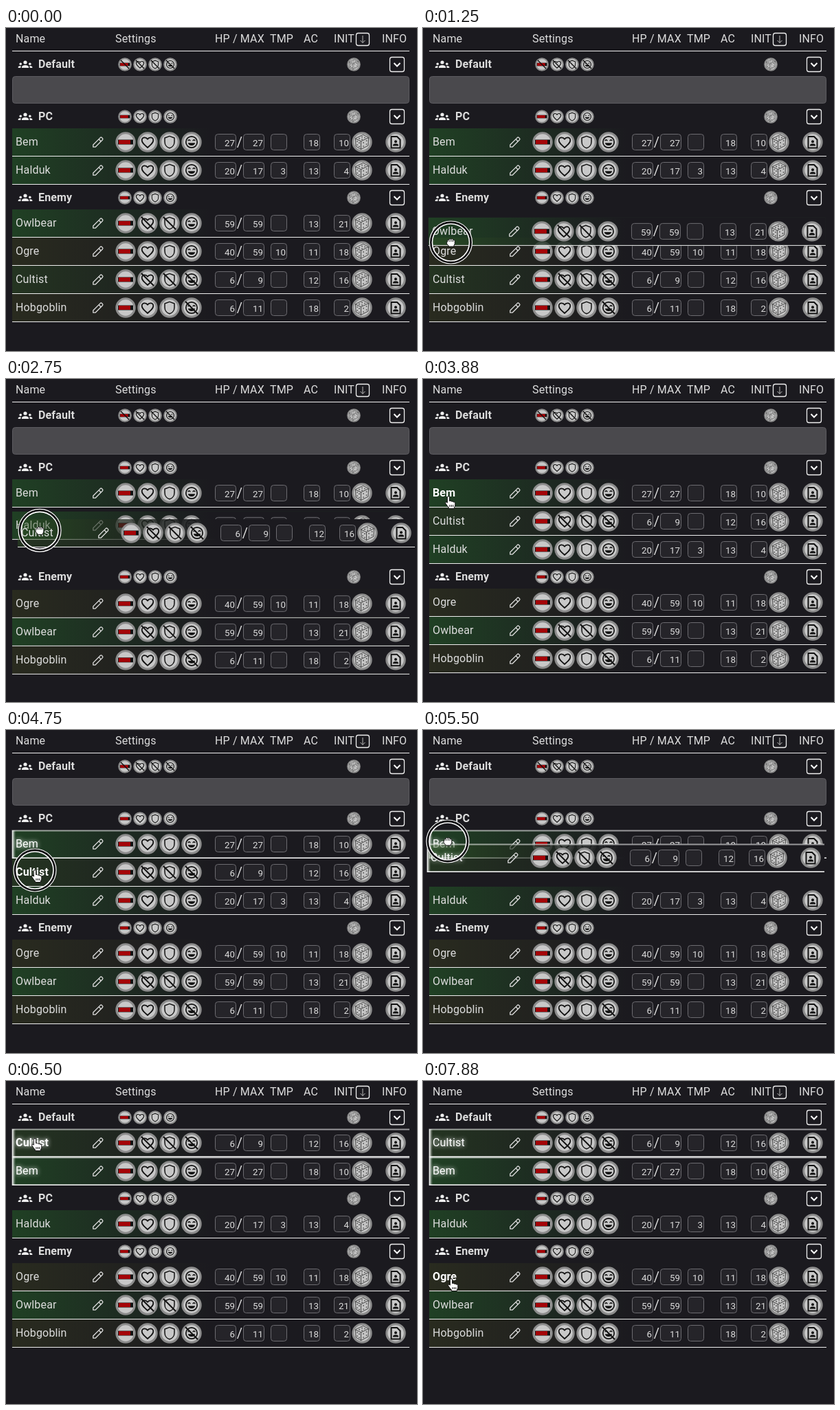
These frames come from a looping animation (598 px wide and 470 px high, 8000 ms). An HTML page:

```html
<!DOCTYPE html>
<html lang="en">
<head>
<meta charset="utf-8">
<title>Initiative list</title>
<style>
  html, body { margin: 0; width: 100%; height: 100%; overflow: hidden; background: #1b1a1f; }
  svg { display: block; }
  text { font: 16px Roboto, Arial, sans-serif; letter-spacing: .15px; fill: #dcdcdc; }
  .group text { font-weight: 700; }
  text.num { font-size: 13.33px; letter-spacing: 0; text-anchor: end; }
  text.per { font-size: 20px; text-anchor: middle; }
  .box { fill: #252429; stroke: #6c6b70; }
  .btn { fill: none; stroke: #eee; stroke-width: 1.3; }
  .line { fill: none; stroke: #111; stroke-linejoin: round; stroke-linecap: round; }
  .hover .name { font-weight: 700; fill: #fff; }
  .glow { display: none; }
  .selected .glow { display: inline; }
  .selected .name { fill: #fff; filter: drop-shadow(0 0 3px #fff); }
  #cursor path { fill: #fff; stroke: #111; stroke-linejoin: round; }
</style>
</head>
<body>
<svg width="598" height="470" viewBox="0 0 598 470">
  <defs>
    <linearGradient id="edge">
      <stop stop-color="#fff" stop-opacity=".8"/>
      <stop offset="1" stop-color="#fff" stop-opacity="0"/>
    </linearGradient>
    <linearGradient id="fade">
      <stop stop-color="#1b1a1f" stop-opacity="0"/>
      <stop offset=".5" stop-color="#1b1a1f"/>
    </linearGradient>
    <g id="bar">
      <rect x="-11" y="-3.5" width="22" height="7" fill="#111"/>
      <rect x="-10" y="-3" width="17" height="6" fill="#a40408"/>
    </g>
    <g id="heart" class="line" stroke-width="1.8">
      <path d="M0 8C-5.5 3.3-8.3 .8-8.3-2.6C-8.3-5-6.5-6.7-4.3-6.7C-2.5-6.7-1-5.8 0-4.2C1-5.8 2.5-6.7 4.3-6.7C6.5-6.7 8.3-5 8.3-2.6C8.3 .8 5.5 3.3 0 8Z"/>
    </g>
    <g id="shield" class="line" stroke-width="1.5">
      <path d="M0-8.6L7-6V-.6C7 3.8 4 7.6 0 8.8C-4 7.6-7 3.8-7-.6V-6Z"/>
    </g>
    <g id="smile">
      <circle class="line" r="8.2" stroke-width="1.7"/>
      <path class="line" d="M-5-2.2q1.5-2 3 0M2-2.2q1.5-2 3 0" stroke-width="1.4"/>
      <path d="M-5.2 1.2H5.2A5.3 4.6 0 0 1-5.2 1.2Z" fill="#111"/>
    </g>
    <path id="slash" class="line" d="M-8.5-8.5L8.5 8.5" stroke-width="2"/>
    <g id="die" class="line" stroke-width="1">
      <path d="M2-10.5L9.5-6.5L9 5L-1.5 10.5L-9 6L-9.5-5Z" fill="#c4c4c4" stroke="#444"/>
      <path d="M-9.5-5L-1.5-1.2L9.5-6.5M-1.5-1.2V10.5" stroke="#444"/>
      <path d="M-4-5.3h.1M0-7.5h.1M4-6.5h.1M0-4h.1M-7-1h.1M-4 1.2h.1M-7 4h.1M-4 6.5h.1M6.5-2h.1M2 .8h.1M6.5 3h.1M2 6h.1" stroke="#444" stroke-width="1.7"/>
    </g>
    <g id="info">
      <path class="line" d="M2-8H-6.5V8.5H6.5V-3.5Z" stroke-width="2"/>
      <circle cy="-.8" r="2" fill="#111"/>
      <path d="M-4 5.5V4.3Q-3.5 2.2 0 2.2T4 4.3V5.5Z" fill="#111"/>
    </g>
    <path id="pencil" d="M-7.2 7.2V4L3.2-6.4Q4.4-7.5 5.5-6.4L6.4-5.5Q7.5-4.4 6.4-3.2L-4 7.2ZM1-4.2L4.2-1" fill="none" stroke="#ddd" stroke-width="1.3" stroke-linejoin="round"/>
    <g id="people" fill="#eee">
      <circle cy="-3" r="2.6"/><circle cx="-6.8" cy="-.8" r="1.8"/><circle cx="6.8" cy="-.8" r="1.8"/>
      <path d="M-5 5V3.6Q-4.4 1 0 1T5 3.6V5ZM-10.3 5V3.6Q-9.8 1.8-6.3 1.9Q-6.6 3-6.5 5ZM10.3 5V3.6Q9.8 1.8 6.3 1.9Q6.6 3 6.5 5Z"/>
    </g>
  </defs>
  <text x="14" y="21">Name</text>
  <text x="159" y="21">Settings</text>
  <text x="304" y="21">HP / MAX</text>
  <text x="384" y="21">TMP</text>
  <text x="433" y="21">AC</text>
  <text x="477" y="21">INIT</text>
  <text x="547" y="21">INFO</text>
  <rect class="btn" x="509.5" y="7.5" width="19" height="18" rx="3"/>
  <path d="M519 11V21.5M515.5 18L519 21.5L522.5 18" fill="none" stroke="#bbb"/>
  <rect x="9" y="33" width="578" height="1" fill="#eee"/>
  <rect id="zone" x="9.5" y="70.5" width="577" height="39" rx="4" fill="#4a494d" stroke="#5c5b60"/>
  <g id="groups"></g>
  <g id="rows"></g>
  <g id="cursor">
    <g id="ring" fill="none" stroke="#fff">
      <circle r="29" stroke="#08080a" stroke-width="5"/>
      <circle r="31" stroke-width="1.2"/>
      <circle r="27" stroke-width="1.6"/>
    </g>
    <path id="pointer" d="M-1.6 1.2a1.6 1.6 0 0 1 3.2 0V6.5Q3.6 5.5 4.4 7.2Q6.4 6.4 7.2 8Q9.4 7.4 9.8 9.4V12.5Q9.6 14.4 8.4 16V17.5H.4V16Q-2 13.6-4.4 9.6Q-4.4 7.4-2.4 8.2L-1.6 9.2ZM2 12v3M4.4 12v3M6.8 12v3"/>
    <path id="grab" d="M-4.5 2L-7.2-1.6Q-7-3.8-5-2.6L-3.2-.8L-4.8-5.6Q-4.2-7.6-2.6-6.2L-1-2L-.8-7.2Q.4-8.8 1.4-7.2L1.6-2L3.2-6.2Q4.8-7.2 5.2-5.4L4.2-.4L5.6-2.4Q7.6-3 7.3-1L4.8 4L4 8H-2.6Z"/>
    <path id="fist" d="M-5-1Q-5.4-4.4-2.8-4Q-1.6-6 .2-4.8Q2-6 3.2-4Q5.6-4.4 5.8-1.8V1.8L4 6H-2.6L-5.8 2Q-6.6-.4-5-1ZM-2.4-3.6V-1M.4-4.4V-1M3-3.6V-1"/>
  </g>
</svg>
<script>
const LOOP = 8000, STEP = 125;
const FIRST_HEAD = 53, HEAD = 36, ROW = 41, EMPTY = 40;
const SLIDE = 200;   // time a row takes to make room
const $ = id => document.getElementById(id);
const clamp = p => Math.max(0, Math.min(1, p));
const easeOut = p => 1 - (1 - clamp(p)) ** 3;
const smooth = p => clamp(p) ** 2 * (3 - 2 * clamp(p));
const mix = (a, b, p) => a + (b - a) * p;

const GREEN = '#2a792c', MOSS = '#325b24', OLIVE = '#3f451f';
// off marks crossed-out settings; nums are HP, max, temporary, AC, initiative
const rows = [
  { name: 'Bem', off: '0000', nums: [27, 27, '', 18, 10], tint: GREEN },
  { name: 'Halduk', off: '0000', nums: [20, 17, 3, 13, 4], tint: GREEN },
  { name: 'Owlbear', off: '0110', nums: [59, 59, '', 13, 21], tint: GREEN },
  { name: 'Ogre', off: '0000', nums: [40, 59, 10, 11, 18], tint: OLIVE },
  { name: 'Cultist', off: '0111', nums: [6, 9, '', 12, 16], tint: MOSS },
  { name: 'Hobgoblin', off: '0001', nums: [6, 11, '', 18, 2], tint: OLIVE }
];
const groups = [
  { name: 'Default', off: '1111', list: [] },
  { name: 'PC', off: '0000', list: ['Bem', 'Halduk'] },
  { name: 'Enemy', off: '0000', list: ['Owlbear', 'Ogre', 'Cultist', 'Hobgoblin'] }
];

// Stops of the hand: time, x, y
const path = [
  [250, 90, 325], [1000, 44, 274], [1500, 37, 350], [1875, 38, 345], [2250, 42, 324], [2625, 50, 223], [3125, 44, 206],
  [3875, 37, 171], [4250, 37, 171], [4750, 42, 204], [5250, 42, 204], [5500, 36, 162], [5750, 42, 84], [6500, 42, 84],
  [7875, 41, 288]
];
const clicks = [{ row: 'Bem', press: 4000, release: 4250 }, { row: 'Cultist', press: 4750, release: 5000 }];
// over lists the places passed: time, group, index
const drags = [
  { row: 'Owlbear', press: 1000, release: 1625, over: [[1000, 2, 0], [1250, 2, 1], [1400, 2, 2]] },
  { row: 'Cultist', press: 2250, release: 3125, over: [[2250, 2, 1], [2375, 2, 0], [2625, 1, 2], [2740, 1, 1]] },
  { row: 'Cultist', press: 5125, release: 6375, over: [[5125, 1, 1], [5600, 1, 0], [5750, 0, 0]], along: ['Bem'] }
];

function handAt(t) {
  const i = path.findIndex(stop => stop[0] > t);
  if (i < 0) return path.at(-1).slice(1);
  if (i === 0) return path[0].slice(1);
  const [t0, x0, y0] = path[i - 1], [t1, x1, y1] = path[i];
  const p = smooth((t - t0) / (t1 - t0));
  return [mix(x0, x1, p), mix(y0, y1, p)];
}

// One stable arrangement of the lists; a dragged row keeps its room at home.
function phase(time, lists, drag, group, index) {
  const heads = [], slots = {};
  let y = FIRST_HEAD;
  lists.forEach((list, g) => {
    const shown = list.filter(name => name !== drag);
    const target = drag && g === group;
    if (target) shown.splice(index, 0, drag);
    shown.forEach((name, i) => slots[name] = { g, i });
    heads.push(y);
    y += HEAD + Math.max(EMPTY, list.length * ROW) + (target && !list.includes(drag) ? ROW : 0);
  });
  return { time, heads, slots, drag, group, empty: !lists[0].length };
}

let lists = groups.map(g => g.list);
const phases = [phase(0, lists)];
for (const d of drags) {
  for (const [time, g, i] of d.over) phases.push(phase(time, lists, d.row, g, i));
  const [, g, i] = d.over.at(-1), moved = [d.row, ...(d.along || [])];
  lists = lists.map(list => list.filter(name => !moved.includes(name)));
  lists[g].splice(i, 0, ...moved);
  phases.push(phase(d.release + STEP, lists));
}

// Rows slide between slots while something is dragged; headings jump.
function rowY(name, t) {
  let slot = 0, y = 0;
  for (const p of phases) {
    if (t < p.time) break;
    const { g, i } = p.slots[name];
    slot = p.drag ? mix(slot, i, easeOut((t - p.time) / SLIDE)) : i;
    y = p.heads[g] + HEAD + 1 + slot * ROW;
  }
  return y;
}

// A dragged row trails the hand by one step, then settles in its slot.
function dragPos(d, t) {
  const [x0, y0] = handAt(d.press), [x, y] = handAt(Math.max(d.press, Math.min(t, d.release) - STEP));
  const settle = easeOut((t - d.release) / STEP);
  const home = rowY(d.row, d.press - 1);
  return [mix(x - x0, 0, settle), mix(home + y - y0, rowY(d.row, d.release), settle)];
}

const icon = (id, x, size, off) => `<g transform="translate(${x}) scale(${size})">
  <circle r="13.2" fill="#c8c8c8" stroke="#8c8c8c" stroke-width="3"/><use href="#${id}"/>
  ${off ? '<use class="slash" href="#slash"/>' : ''}</g>`;
const settings = (x, gap, size, off) => ['bar', 'heart', 'shield', 'smile']
  .map((id, i) => icon(id, x + i * gap, size, off[i] === '1')).join('');

const fields = [[304, 31], [345, 31], [385, 24], [433, 24], [477, 24]];
const field = ([x, w], value) =>
  `<rect class="box" x="${x + .5}" y="-11.5" width="${w - 1}" height="23" rx="4"/>
   <text class="num" x="${x + w - 2}" y="6">${value}</text>`;

const rowMarkup = r => `
  <rect x="9" y="-20" width="578" height="40" fill="${r.tint}" opacity=".4"/>
  <rect x="9" y="-20" width="578" height="40" fill="url(#fade)"/>
  <rect x="9" y="20" width="578" height="1" fill="#eee"/>
  <g class="glow">
    <rect x="9" y="-20" width="5" height="40" fill="url(#edge)"/>
    <path d="M587-19.5H9.5V20H587" fill="none" stroke="#fff" stroke-width="2" opacity=".55" style="filter:blur(.7px)"/>
  </g>
  <text class="name" x="14" y="5">${r.name}</text>
  <use href="#pencil" x="134"/>
  ${settings(174, 32, 1, r.off)}
  ${fields.map((f, n) => field(f, r.nums[n])).join('')}
  <text class="per" x="340" y="6.5">/</text>
  ${icon('die', 518, 1)}${icon('info', 567, 1)}`;

const groupMarkup = g => `
  <use href="#people" x="28"/><text x="47" y="5">${g.name}</text>
  ${settings(173, 22, .67, g.off)}${icon('die', 506, .67)}
  <rect class="btn" x="558.5" y="-10.5" width="21" height="21" rx="3"/>
  <path d="M564.5 -2L569 2.5L573.5 -2" fill="none" stroke="#fff" stroke-width="2"/>`;

function build(items, parent, markup, cls) {
  for (const item of items) {
    item.el = document.createElementNS('http://www.w3.org/2000/svg', 'g');
    item.el.setAttribute('class', cls);
    item.el.innerHTML = markup(item);
    parent.append(item.el);
  }
}
build(groups, $('groups'), groupMarkup, 'group');
build(rows, $('rows'), rowMarkup, 'row');
const defaultSlashes = groups[0].el.querySelectorAll('.slash');

const place = (el, x, y) => el.setAttribute('transform', `translate(${x.toFixed(2)} ${y.toFixed(2)})`);
const show = (el, on) => el.setAttribute('visibility', on ? 'visible' : 'hidden');

function draw(t) {
  const [cx, cy] = handAt(t), seen = t >= path[0][0];
  const now = phases.findLast(p => t >= p.time);
  const drag = drags.find(d => t >= d.press && t < d.release + STEP);
  let hovered = false;
  groups.forEach((g, i) => place(g.el, 0, now.heads[i]));
  for (const r of rows) {
    const [x, y] = drag && drag.row === r.name ? dragPos(drag, t) : [0, rowY(r.name, t)];
    const over = seen && !drag && Math.abs(cy - y) < 13;
    hovered ||= over;
    place(r.el, x, y);
    r.el.classList.toggle('hover', over);
    r.el.classList.toggle('selected', clicks.some(c => c.row === r.name && t >= c.press + STEP));
    if (now.drag === r.name && r.el !== $('rows').lastChild) $('rows').append(r.el);
  }

  show($('zone'), now.empty);
  $('zone').setAttribute('height', now.group === 0 ? EMPTY - 4 : EMPTY - 1);
  defaultSlashes.forEach(s => show(s, now.empty));

  const shape = drag ? 'fist' : hovered ? 'pointer' : 'grab';
  place($('cursor'), cx, cy);
  for (const id of ['fist', 'pointer', 'grab']) show($(id), seen && id === shape);
  show($('ring'), [...clicks, ...drags].some(c => t >= c.press && t < c.release));
}

const start = performance.now();
function tick() {
  const t = (performance.now() - start) % LOOP;
  draw(Math.floor(t / STEP) * STEP);
  requestAnimationFrame(tick);
}
tick();
</script>
</body>
</html>
```
